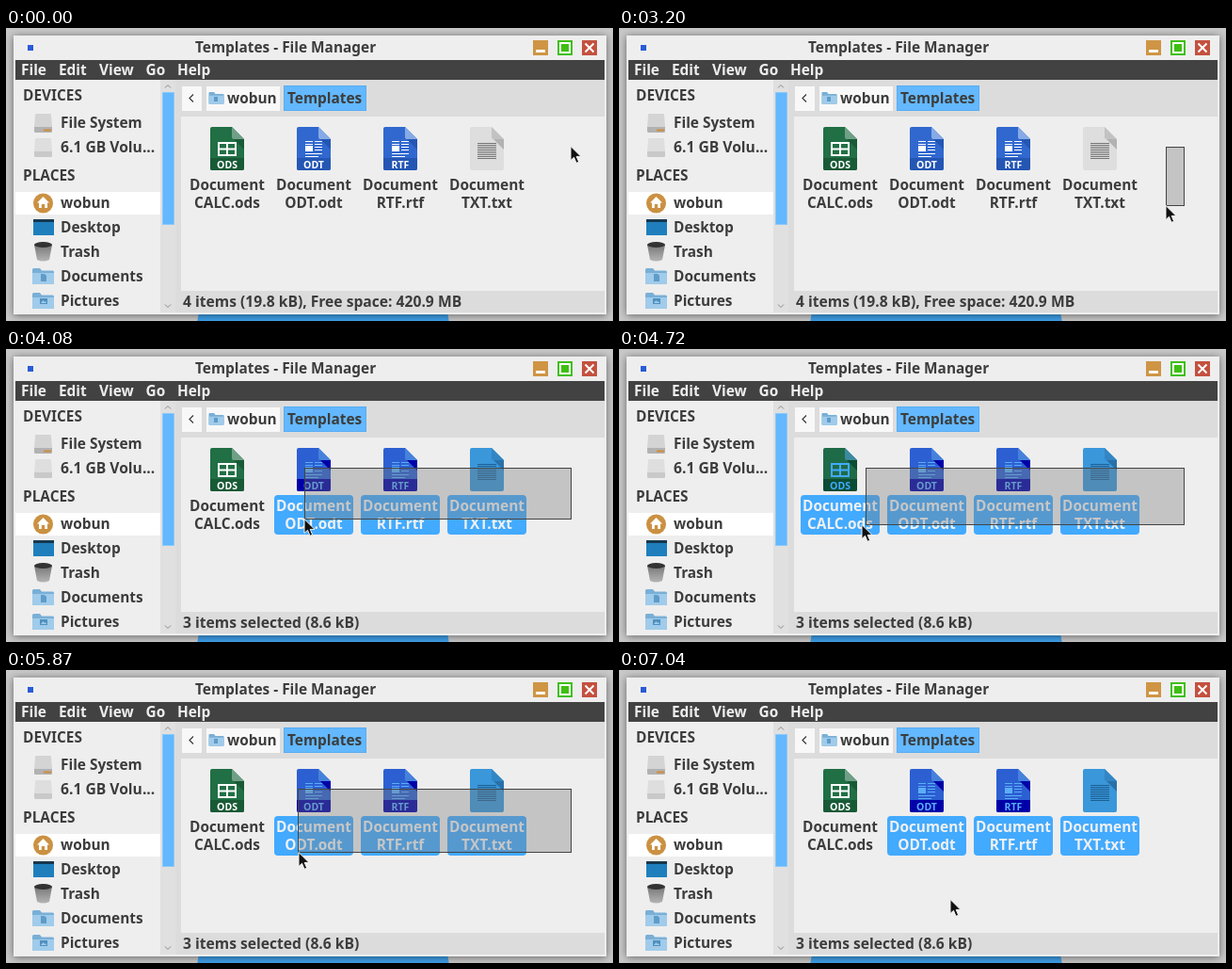
Animation, 645 px wide and 311 px high, one loop 9.69 s. Source, as an HTML page:

```html
<!DOCTYPE html>
<html lang="en">
<head>
<meta charset="utf-8">
<title>Rubber band selection</title>
<style>
  html, body { margin: 0; width: 100%; height: 100%; overflow: hidden; background: #c8c8c8; }
  svg { display: block; width: 100vw; height: 100vh; }
  text { font: bold 15.4px "Noto Sans", "Open Sans", sans-serif; fill: #3c3c3c; }
  .menu text { fill: #eee; }
  .wide { font-size: 15.65px; }
  .label { text-anchor: middle; }
  .badge { font-size: 10.5px; text-anchor: middle; fill: var(--ink); }
  .body { fill: var(--body); }
  .fold { fill: var(--fold); }
  .shade { fill: var(--shade); }
  .band { fill: var(--band); }
  .ink { fill: none; stroke: var(--ink); }
  .inkfill { fill: var(--ink); }
  .plate { fill: #42aaff; visibility: hidden; }
  .ods { --body: #216f45; --band: #185a36; --fold: #6fa087; --shade: #185a36; --ink: #fff; }
  .doc { --body: #3068cf; --band: #2456b4; --fold: #86aae6; --shade: #2456b4; --ink: #fff; }
  .txt { --body: #dedede; --fold: #c2c2c2; --shade: #b2b2b2; --ink: #737373; }
  .on .plate { visibility: visible; }
  .on .label { fill: #f0f0f0; }
  .on.ods { --body: #1e6b48; --band: #0a4c34; --fold: #3c8aa0; --shade: #0a4c34; --ink: #42aaff; }
  .on.doc { --body: #2c5fd2; --band: #0000a8; --fold: #4682dc; --shade: #0000a8; --ink: #5aaef8; }
  .on.txt { --body: #3a97da; --fold: #3386c4; --shade: #2871aa; --ink: #1c5f93; }
  .hover { filter: brightness(1.1); }
</style>
</head>
<body>
<svg viewBox="0 0 645 311">
  <defs>
    <filter id="blur" x="-10%" y="-10%" width="120%" height="120%"><feGaussianBlur stdDeviation="4"/></filter>
    <linearGradient id="tin" x2="0" y2="1">
      <stop stop-color="#777"/><stop offset="1" stop-color="#b4b4b4"/>
    </linearGradient>
    <g id="folder">
      <path d="M0 1.5Q0 0 1.5 0H8L10 2.5H21.5Q23 2.5 23 4V15.5Q23 17 21.5 17H1.5Q0 17 0 15.5Z" fill="#79afd6"/>
      <path d="M0 5H23V15.5Q23 17 21.5 17H1.5Q0 17 0 15.5Z" fill="#a0cbea"/>
    </g>
    <g id="drive">
      <path d="M2 0H17Q18 0 18 1L19 14H0L1 1Q1 0 2 0Z" fill="#d4d4d4"/>
      <path d="M0 14H19V18.5Q19 20 17.5 20H1.5Q0 20 0 18.5Z" fill="#b2b2b2"/>
    </g>
  </defs>

  <rect width="645" height="311" fill="#c8c8c8"/>
  <circle cx="337" cy="330" r="135" fill="#3f9fe8"/>
  <rect x="8" y="9" width="630" height="296" fill="#000" opacity=".5" filter="url(#blur)"/>
  <rect x="8" y="8" width="630" height="296" fill="#eee"/>
  <rect x="10" y="55" width="626" height="247" fill="#dcdcdc"/>

  <rect x="23" y="18" width="6" height="6" fill="#2a5bd7"/>
  <text x="201" y="26">Templates - File Manager</text>
  <rect x="560" y="13" width="16" height="16" fill="#cf9544"/>
  <path d="M563 24.500H573" stroke="#fff" stroke-width="3"/>
  <rect x="586" y="13" width="16" height="16" fill="#3fbf12"/>
  <rect x="589" y="16" width="10" height="10" fill="none" stroke="#fff" stroke-width="2"/>
  <rect x="612" y="13" width="16" height="16" fill="#c4513f"/>
  <path d="M615.500 16.500L624.500 25.500M624.500 16.500L615.500 25.500" stroke="#fff" stroke-width="2"/>

  <g class="menu">
    <rect x="10" y="34" width="626" height="21" fill="#424242"/>
    <text x="16" y="50">File</text>
    <text x="56" y="50">Edit</text>
    <text x="99" y="50">View</text>
    <text x="148.500" y="50">Go</text>
    <text x="182" y="50">Help</text>
  </g>

  <rect x="10" y="55" width="154" height="247" fill="#eee"/>
  <rect x="10" y="174" width="154" height="24" fill="#fff"/>
  <g>
    <text x="18" y="77">DEVICES</text>
    <text x="58" y="106">File System</text>
    <text x="58" y="132" class="wide">6.1 GB Volu...</text>
    <text x="18" y="162">PLACES</text>
    <text x="58" y="191">wobun</text>
    <text x="58" y="217">Desktop</text>
    <text x="58" y="243">Trash</text>
    <text x="58" y="269">Documents</text>
    <text x="58" y="295">Pictures</text>
  </g>
  <use href="#drive" x="30" y="91"/>
  <path d="M40 108.500H48" stroke="#cf8a3c" stroke-width="2"/>
  <use href="#drive" x="30" y="117" opacity=".6"/>
  <circle cx="39.500" cy="186" r="10.500" fill="#cb9142"/>
  <path d="M39.500 179L46 185.500H44V191H41.200V187H37.800V191H35V185.500H33Z" fill="#fff"/>
  <rect x="29" y="203" width="22" height="17" fill="#1f7fbd"/>
  <path d="M29 203H51V206H29Z" fill="#17384f"/>
  <path d="M30 230L33 246Q39.500 249 46 246L49 230Z" fill="url(#tin)"/>
  <ellipse cx="39.500" cy="230" rx="9.500" ry="3" fill="#333"/>
  <use href="#folder" x="28" y="255"/>
  <path d="M37 261H41L43 263V269H37Z" fill="#5f9cc9"/>
  <use href="#folder" x="28" y="281"/>
  <rect x="36" y="287" width="8" height="6" fill="#4f90c0"/>
  <path d="M37 292L39.500 289L41 291L42 290L43 292Z" fill="#a0cbea"/>

  <rect x="164" y="55" width="16" height="247" fill="#e0e0e0"/>
  <rect x="166.500" y="68.500" width="12" height="140" fill="#63b8ff" stroke="#8ac8fb"/>
  <path d="M169 63.500L172 60.500L175 63.500M169 293.500L172 296.500L175 293.500" fill="none" stroke="#8a8a8a"/>

  <rect x="187" y="62" width="21" height="26" fill="#f8f8f8"/>
  <path d="M199 70.500L195 74.500L199 78.500" fill="none" stroke="#3a3a3a" stroke-width="1.200"/>
  <rect x="213" y="62" width="78" height="26" fill="#f8f8f8"/>
  <use href="#folder" transform="translate(215.500 68) scale(.7 .75)"/>
  <rect x="221" y="73" width="4" height="5" fill="#5f9cc9"/>
  <text x="235" y="80">wobun</text>
  <rect x="295.500" y="61.500" width="87" height="26" fill="#63b8ff" stroke="#56adf4"/>
  <text x="299" y="80">Templates</text>

  <rect x="186" y="94" width="450" height="185" fill="#eee"/>
  <g id="files"></g>
  <text id="status" class="wide" x="188" y="296"></text>
  <rect id="band" fill="rgba(120,120,120,.355)" stroke="#444"/>
  <path id="pointer" d="M0 .5V15.500L3.500 12.300L6 18.300L8.700 17.200L6.200 11.400H11Z" fill="#111" stroke="#f4f4f4"/>
</svg>
<script>
const LOOP = 9690, RELEASE = 6350;
const ANCHOR = { x: 600, y: 126 };
const REST = { x: 600, y: 125 };
const $ = id => document.getElementById(id);

// Pointer strokes: start, end, number of steps, [step, x, y] points
const strokes = [
  [2210, 2570, 8, [[0, 597, 132], [3, 593, 160], [7, 589, 188]]],
  [3200, 4080, 21, [[0, 581, 188], [4, 511, 184], [10, 434, 180], [11, 426, 178], [16, 355, 179], [20, 317, 180]]],
  [4210, 4290, 3, [[0, 314, 181], [2, 309, 183]]],
  [4550, 5110, 12, [[0, 301, 184], [1, 285, 185], [2, 262, 186], [3, 258, 186], [7, 232, 189], [11, 222, 192]]],
  [5390, 6070, 17, [[0, 225, 192], [5, 268, 192], [10, 310, 193], [11, 311, 193], [16, 318, 195]]],
  [6680, 7040, 10, [[0, 319, 194], [2, 325, 200], [6, 345, 230], [9, 352, 243]]]
];

const files = [
  { x: 511, kind: "txt", name: "TXT.txt" },
  { x: 419, kind: "doc", name: "RTF.rtf", badge: "RTF" },
  { x: 327, kind: "doc", name: "ODT.odt", badge: "ODT" },
  { x: 235, kind: "ods", name: "CALC.ods", badge: "ODS" }
];
const summaries = [
  "4 items (19.8 kB), Free space: 420.9 MB",
  "\"Document TXT.txt\" (0 bytes) plain text document",
  "2 items selected (6 bytes)",
  "3 items selected (8.6 kB)",
  "4 items selected (19.8 kB)"
];
const glyphs = {
  ods: '<path class="ink" stroke-width="2" d="M-9 17H9V30H-9ZM-9 23.500H9M0 17V30"/>',
  doc: '<path class="ink" d="M-9 15.500H-1M-9 18.500H-1M1 15.500H9M1 18.500H9M1 21.500H9M1 24.500H9M-9 28.500H9M-9 31.500H5"/>' +
       '<rect class="inkfill" x="-9" y="20" width="8" height="6"/>',
  txt: '<path class="ink" stroke-width="20" stroke-dasharray="1" d="M0 17V34"/>'
};

const fileMarkup = ({ x, kind, name, badge }) => `
  <g class="${kind}" transform="translate(${x} 105)">
    <path class="body" d="M-16 0H5L18 13V44Q18 46 16 46H-16Q-18 46 -18 44V2Q-18 0 -16 0Z"/>
    <path class="shade" d="M7 13H18V24Z"/>
    <path class="fold" d="M5 0L18 13H7Q5 13 5 11Z"/>
    ${glyphs[kind]}
    ${badge ? `<path class="band" d="M-18 33H18V44Q18 46 16 46H-16Q-18 46 -18 44Z"/>
    <text class="badge" y="43.500">${badge}</text>` : ""}
    <rect class="plate" x="-42" y="50" width="84" height="42" rx="4"/>
    <text class="label" y="67">Document</text>
    <text class="label" y="86">${name}</text>
  </g>`;
$("files").innerHTML = files.map(fileMarkup).join("");
const nodes = [...$("files").children];

function along(points, k) {
  const i = Math.max(1, points.findIndex(p => p[0] >= k));
  const [a, b] = [points[i - 1], points[i]];
  const u = (k - a[0]) / (b[0] - a[0]);
  return { x: Math.round(a[1] + (b[1] - a[1]) * u), y: Math.round(a[2] + (b[2] - a[2]) * u) };
}

// The band trails one step behind the pointer while it moves
function corner([, , n, points], k) {
  return along(points, k > 0 && k < n - 1 ? k - 1 : k);
}

const countHit = left => files.filter(f => left < f.x + 42).length;

function stateAt(t) {
  const stroke = strokes.findLast(s => t >= s[0]);
  if (!stroke) return { tip: REST, picked: 0, told: 0 };
  const [start, end, n, points] = stroke;
  const k = Math.min(n - 1, Math.floor((t - start) / (end - start) * (n - 1) + 1e-6));
  const tip = along(points, k);
  if (t >= RELEASE) return { tip, picked: 3, told: 3, hover: t >= 6680 && tip.y < 197 };
  const edge = corner(stroke, k);
  const before = k < n - 1 ? corner(stroke, Math.max(0, k - 1)) : edge;
  return { tip, edge, picked: countHit(edge.x), told: countHit(before.x) };
}

function draw(now) {
  const { tip, edge, picked, told, hover } = stateAt(now % LOOP);
  $("pointer").setAttribute("transform", `translate(${tip.x} ${tip.y})`);
  const band = $("band");
  band.style.display = edge ? "" : "none";
  if (edge) {
    band.setAttribute("x", edge.x + .5);
    band.setAttribute("y", ANCHOR.y + .5);
    band.setAttribute("width", ANCHOR.x - edge.x);
    band.setAttribute("height", edge.y - ANCHOR.y);
  }
  nodes.forEach((node, i) => node.classList.toggle("on", i < picked));
  nodes[2].classList.toggle("hover", !!hover);
  $("status").textContent = summaries[told];
}

const origin = performance.now();
function tick() {
  draw(performance.now() - origin);
  requestAnimationFrame(tick);
}
tick();
</script>
</body>
</html>
```
